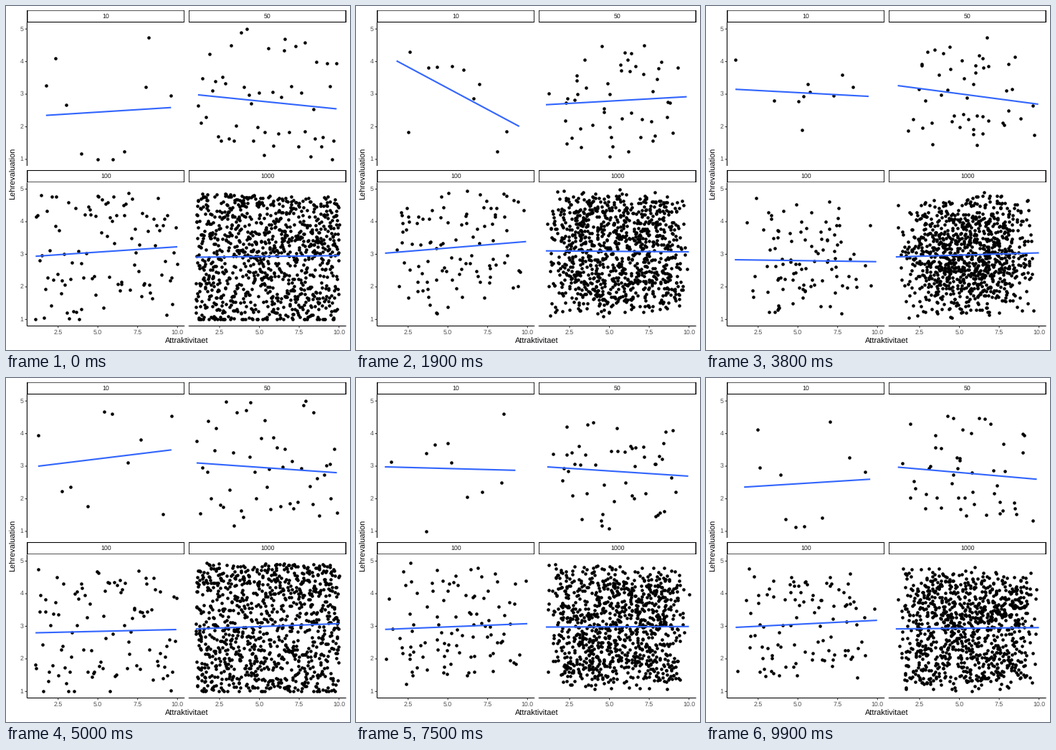
A matplotlib script for the animation above (10000 ms loop, 480 by 480 pixels).

```python
import numpy as np
import matplotlib.pyplot as plt
from matplotlib.animation import FuncAnimation
from matplotlib.patches import Rectangle

plt.rcParams["font.family"] = "Liberation Sans"
plt.rcParams["text.hinting"] = "none"

SIZE = 480
STATES, STEP = 10, 10                  # ten samples, ten frames each
LEFT, TOP, WIDE, HIGH = 29.4, 23.0, 219.8, 200.1
DX, DY = 225.4, 223.4                  # distance between panels
STRIP = 17.4
BLUE = "#3366FF"

# Sample size: height of the regression line at its two ends, per sample
TRENDS = {
    10: ([2.35, 3.64, 4.10, 3.75, 2.85, 3.00, 3.25, 3.00, 2.88, 2.40],
         [2.59, 2.22, 1.97, 2.30, 3.25, 3.50, 3.98, 3.00, 2.24, 2.65]),
    50: ([2.98, 3.51, 2.51, 3.05, 3.37, 3.10, 2.83, 2.95, 3.12, 2.92],
         [2.55, 3.13, 2.88, 2.70, 2.69, 2.80, 2.97, 2.75, 2.42, 2.85]),
    100: ([2.94, 3.20, 3.00, 2.88, 2.81, 2.80, 2.84, 2.90, 2.93, 3.10],
          [3.23, 3.04, 3.46, 2.92, 2.70, 2.90, 3.18, 3.10, 2.98, 2.95]),
    1000: ([2.91, 2.93, 3.14, 2.96, 2.90, 2.92, 2.93, 2.97, 3.01, 2.97],
           [2.96, 3.05, 3.08, 3.05, 3.04, 3.08, 3.13, 3.00, 2.96, 2.96]),
}

rng = np.random.default_rng(7)


def sample(n, start, end):
    """Evenly spread random points whose fit runs from start to end."""
    x = 1 + 9 * (rng.permutation(n) + rng.random(n)) / n
    y = rng.uniform(1, 5, n)
    ends = np.array([x.min(), x.max()])
    y += np.interp(x, ends, [start, end]) - np.polyval(np.polyfit(x, y, 1), x)
    return np.array([x, y.clip(1, 5)]), np.array([ends, [start, end]])


def px(value, left):
    return left + (value - 0.55) * WIDE / 9.9


def py(value, top):
    return top + (5.2 - value) * HIGH / 4.4


fig = plt.figure(figsize=(SIZE / 72, SIZE / 72), dpi=72, facecolor="white")
ax = fig.add_axes([0, 0, 1, 1])
ax.set_xlim(0, SIZE)
ax.set_ylim(SIZE, 0)
ax.axis("off")


def rule(x, y, color="black"):
    ax.plot(x, y, color=color, lw=1.07, solid_capstyle="butt", snap=False)


def label(x, y, text, size=8.8, color="#4D4D4D", **kw):
    ax.text(x, y, text, size=size, color=color,
            **{"ha": "center", "va": "center", **kw})


def strip(left, top, text):
    # the outer half of the border is cut off
    box = Rectangle((left, top - STRIP), WIDE, STRIP, fc="white", ec="black",
                    lw=2.13, snap=False)
    ax.add_patch(box)
    box.set_clip_path(box)
    label(left + WIDE / 2, top - STRIP / 2, text, color="#1A1A1A")


def y_axis(left, top):
    rule([left, left], [top, top + HIGH])
    for v in range(1, 6):
        y = py(v, top)
        rule([left - 2.8, left], [y, y], "#333333")
        label(left - 4.9, y, str(v), ha="right")


def x_axis(left, y):
    rule([left, left + WIDE], [y, y])
    for v in (2.5, 5.0, 7.5, 10.0):
        x = px(v, left)
        rule([x, x], [y, y + 2.8], "#333333")
        label(x, y + 9.3, f"{v:.1f}")


panels = []
for i, (count, trend) in enumerate(TRENDS.items()):
    row, col = divmod(i, 2)
    left, top = LEFT + col * DX, TOP + row * DY
    strip(left, top, str(count))
    if col == 0:
        y_axis(left, top)
    if row == 1:
        x_axis(left, top + HIGH)
    dots, = ax.plot([], [], "o", color="black", ms=4.6, mew=0, zorder=3)
    line, = ax.plot([], [], color=BLUE, lw=2.13, zorder=4,
                    solid_capstyle="butt", snap=False)
    points, fits = zip(*(sample(count, a, b) for a, b in zip(*trend)))
    panels += [(dots, points, left, top), (line, fits, left, top)]

label(LEFT + (DX + WIDE) / 2, 468, "Attraktivitaet", 11, "black")
label(10.3, 234.3, "Lehrevaluation", 11, "black", rotation=90)


def draw(n):
    k, r = divmod(n, STEP)
    rest = 3 if k == 0 else 4          # the first sample rests one frame less
    u = max(0, r - rest) / (STEP - rest)
    for artist, states, left, top in panels:
        x, y = (1 - u) * states[k] + u * states[(k + 1) % STATES]
        artist.set_data(px(x, left), py(y, top))
    return [panel[0] for panel in panels]


anim = FuncAnimation(fig, draw, frames=STATES * STEP, interval=100,
                     repeat=True, repeat_delay=0)
plt.show()
```
